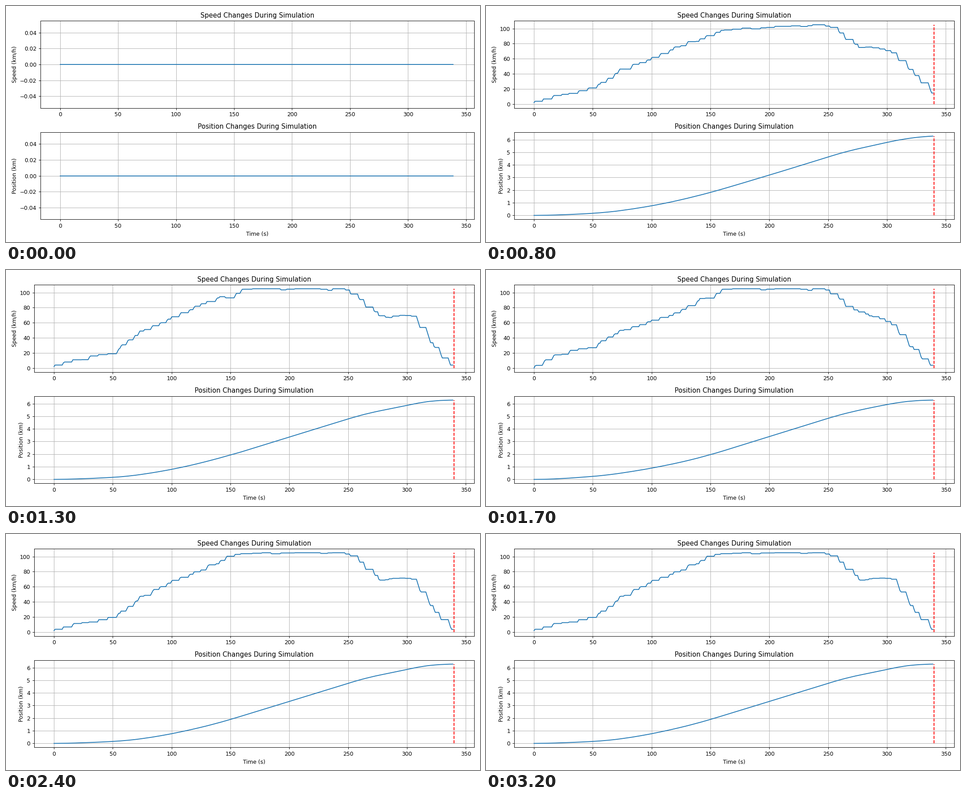
Recreate the animation shown at these times as a matplotlib script. Size 1058 by 529 pixels, loop 3.3 s.

```python
import numpy as np
import matplotlib.pyplot as plt
from matplotlib.animation import FuncAnimation

WIDTH, HEIGHT = 1058, 529
FRAMES, INTERVAL = 33, 100
DURATION = 340              # seconds per simulated run
DISTANCE = 6.28             # km between the two stops
TOP_SPEED = 105             # km/h
MAX_GAIN, MAX_BRAKE = 3, 5  # km/h per second

# Key speeds of the four strategies, tried one after the other.
KEY_TIMES = [0, 20, 50, 73, 100, 122, 150, 160, 250, 270, 280, 308, 315, 326, 339]
STRATEGIES = [
    [2, 11, 20, 46, 61, 75, 90, 99, 105, 81, 74, 69, 49, 38, 11],
    [2, 11, 20, 48, 66, 83, 97, 105, 105, 78, 67, 70, 40, 24, 0],
    [0, 18, 28, 49, 62, 74, 97, 105, 105, 79, 73, 57, 33, 22, 0],
    [2, 11, 18, 47, 68, 79, 100, 105, 105, 78, 67, 72, 39, 26, 0],
]
STRATEGY_CHANGES = [11, 15, 21]

# The driver only picks a new speed at these irregular moments.
gaps = np.random.default_rng(4).integers(3, 9, DURATION)
switches = np.concatenate([[0], np.cumsum(gaps)])
switches = switches[switches < DURATION]
midpoints = (switches + np.append(switches[1:], DURATION)) / 2


def simulate(frame):
    """Speed (km/h) and position (km) for every second of one run."""
    if frame <= 15 and frame % 5 == 0:  # the train never departs
        return np.zeros(DURATION), np.zeros(DURATION)

    key_speeds = STRATEGIES[np.searchsorted(STRATEGY_CHANGES, frame, "right")]
    wobble = np.random.default_rng(frame % 4).normal(0, 1.3, len(switches))
    levels = np.interp(midpoints, KEY_TIMES, key_speeds) + wobble
    levels = np.clip(levels, 0, TOP_SPEED)

    speed = np.empty(DURATION)
    value = key_speeds[0]
    for second in range(DURATION):
        speed[second] = value
        target = levels[np.searchsorted(switches, second, "right") - 1]
        value += np.clip(target - value, -MAX_BRAKE, MAX_GAIN)
    travelled = np.cumsum(speed)
    return speed, DISTANCE * travelled / travelled[-1]


def set_margins(left, right=1044.8, top=33.2, bottom=478.3, gap=54):
    """Place both panels, with all distances in pixels."""
    panel_height = (bottom - top - gap) / 2
    fig.subplots_adjust(left=left / WIDTH, right=right / WIDTH,
                        top=1 - top / HEIGHT, bottom=1 - bottom / HEIGHT,
                        hspace=gap / panel_height)


def draw_panel(ax, name, unit, values):
    ax.plot(values)
    ax.vlines(DURATION, 0, values.max(), colors="red", linestyles="--")
    ax.set_title(f"{name} Changes During Simulation")
    ax.set_ylabel(f"{name} ({unit})")
    ax.grid(True)


def update(frame):
    fig.clf()
    speed_ax, position_ax = fig.subplots(2, 1)
    speed, position = simulate(frame)
    draw_panel(speed_ax, "Speed", "km/h", speed)
    draw_panel(position_ax, "Position", "km", position)
    position_ax.set_xlabel("Time (s)")
    set_margins(left=62.5 if speed.any() else 76.8)
    return []


fig = plt.figure(figsize=(12, 6), dpi=HEIGHT / 6)
anim = FuncAnimation(fig, update, frames=FRAMES, interval=INTERVAL,
                     init_func=lambda: [], repeat=True, repeat_delay=0)
plt.show()
```
